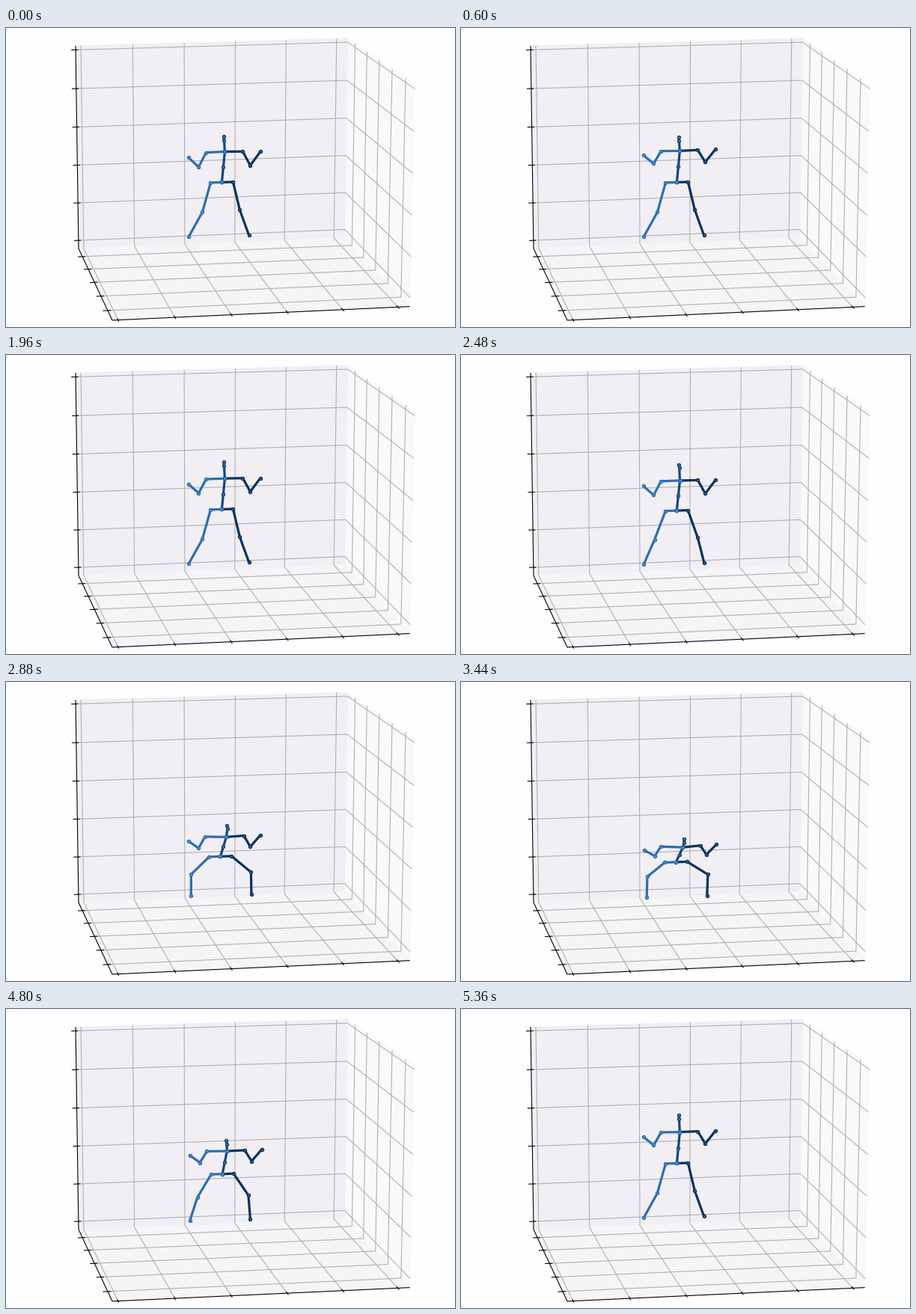
A matplotlib script for the animation above (5400 ms loop, 600 by 400 pixels).

```python
import numpy as np
import matplotlib.pyplot as plt
from matplotlib.animation import FuncAnimation

W, H, DPI = 600, 400, 100
FRAMES, STEP = 135, 40
PT = 72 / DPI

fig = plt.figure(figsize=(W / DPI, H / DPI), dpi=DPI, facecolor="#fefdff")
ax = fig.add_axes([0, 0, 1, 1])
ax.set_xlim(0, W)
ax.set_ylim(H, 0)
ax.axis("off")


# Perspective room: each axis runs from the far lower left corner to a
# vanishing-weighted corner (screen x, screen y, relative depth)
def corner(x, y, depth):
    return np.array([x, y, 1]) * depth


ORIGIN = corner(97, 295, 1)
AXES = np.array([corner(452.5, 280.3, 1.018),  # across
                 corner(142, 391, 0.89),       # towards the viewer
                 corner(93, 24, 0.978)]) - ORIGIN  # up


def project(*p):
    x, y, depth = ORIGIN + np.array(p) @ AXES
    return x / depth, y / depth


def line(*pts, color="#b0b0b0"):
    ax.plot(*zip(*(project(*p) for p in pts)), color=color, lw=1.1 * PT,
            solid_capstyle="butt", zorder=2)


def pane(color, *pts):
    ax.fill(*zip(*(project(*p) for p in pts)), facecolor=color,
            edgecolor=color, lw=0.7, zorder=1)


def draw_room():
    pane("#f9f8fb", (1, 0, 0), (1, 1, 0), (1, 1, 1), (1, 0, 1))
    pane("#f1eff3", (0, 0, 0), (1, 0, 0), (1, 0, 1), (0, 0, 1))
    pane("#f5f4f7", (0, 0, 0), (1, 0, 0), (1, 1, 0), (0, 1, 0))
    ink, gap = "black", 0.188
    wide = 0.019 + gap * np.arange(6)
    for a in wide:
        line((a, 0, 1), (a, 0, 0), (a, 1, 0))
        line((a, 0.98, 0), (a, 1.02, 0), color=ink)
    for a in 0.125 + gap * np.arange(5):
        line((0, a, 0), (1, a, 0), (1, a, 1))
        line((-0.016, a, 0), (0.011, a, 0), color=ink)
    for a in 1 - wide:
        line((0, 0, a), (1, 0, a), (1, 1, a))
        line((-0.016, 0, a), (0.009, 0, a), color=ink)
    line((0, 0, 1), (0, 0, 0), (0, 1, 0), (1, 1, 0), color=ink)


def skeleton(crouch, lean, lift, nod):
    """Polylines: right-hand limbs, torso, left-hand limbs."""
    hip = np.array([289 - 2 * crouch + 3 * lean, 207 + 27 * crouch])
    chest = np.array([293 + 2 * crouch + 3 * lean, 166 + 42 * crouch + 4 * lean - lift])
    head = chest + (-1.5 + 2.5 * crouch - lean,
                    -20 + 4.5 * crouch + 6.5 * lean + nod + lift)
    torso = [hip, (hip + chest) / 2, chest, head + (0.5, 4.5), head]

    def arm(side):
        x, y = 292.5 + 3 * lean, chest[1]
        return [chest,
                (x + side * (24.5 + 1.5 * crouch),
                 y + 0.5 - 1.7 * crouch - lift - 0.7 * side),
                (x + side * 34.5,
                 y + 19.5 - 5.5 * crouch - 3.5 * lean - 3.5 * lift - side),
                (x + side * 48, y + 4 - 2.5 * crouch - 1.5 * lean - 2 * lift - 4 * side)]

    def leg(side):
        spread = 25 + 15 * np.sqrt(crouch) - 3 * lean
        return [hip, hip + (side * 15, -0.5 * side),
                (288 + 4 * lean + side * spread, 245.5 + 11 * crouch - 1.5 * side),
                (285 + 3.2 * crouch + side * 40.3, 279 + 6.5 * crouch - side)]

    return [np.array(p) - 0.6 for p in (arm(1), leg(1), torso, leg(-1), arm(-1))]


# time, crouch, lean, arm lift, head nod
KEYS = np.array([
    (0, 0, 0, 0, 0),
    (600, 0, 0, 1, 1),
    (1400, 0, 0, 0.5, -2.5),
    (2200, 0, 0, 0.2, -2),
    (2400, 0, 0, 0.2, -2),
    (2880, 1, 0, 0, 0),
    (3440, 1.28, 0.5, 0, 0),
    (4000, 1, 1, 0, 0),
    (4800, 0.53, 0.6, 0, 0),
    (5360, 0, 0, 0.8, -3),
])
T, P = KEYS[:, 0], KEYS[:, 1:]

# Monotone cubic tangents, so nothing overshoots a key
slope = np.diff(P, axis=0) / np.diff(T)[:, None]
a, b = slope[:-1], slope[1:]
same = a * b > 0
M = np.zeros_like(P)
M[1:-1] = np.where(same, 2 * a * b / np.where(same, a + b, 1), 0)


def state(t):
    i = min(np.searchsorted(T, t, side="right") - 1, len(T) - 2)
    h = T[i + 1] - T[i]
    s = (t - T[i]) / h
    r = 1 - s
    return (r * r * ((1 + 2 * s) * P[i] + s * h * M[i])
            + s * s * ((1 + 2 * r) * P[i + 1] - r * h * M[i + 1]))


def limb(edge, face):
    return ax.plot([], [], color=edge, lw=3.2 * PT, marker="o", ms=3.8 * PT,
                   mfc=face, mec=edge, mew=1.6 * PT, zorder=3)[0]


DARK, MID, LIGHT = ("#07315f", "#4f76a0"), ("#0f4580", "#5f89b8"), ("#2d6db3", "#6f9dcf")

draw_room()
limbs = [limb(*tone) for tone in (DARK, DARK, MID, LIGHT, LIGHT)]


def update(n):
    for part, points in zip(limbs, skeleton(*state(n * STEP))):
        part.set_data(*points.T)
    return limbs


anim = FuncAnimation(fig, update, frames=FRAMES, interval=STEP, repeat=True, repeat_delay=0)
plt.show()
```
